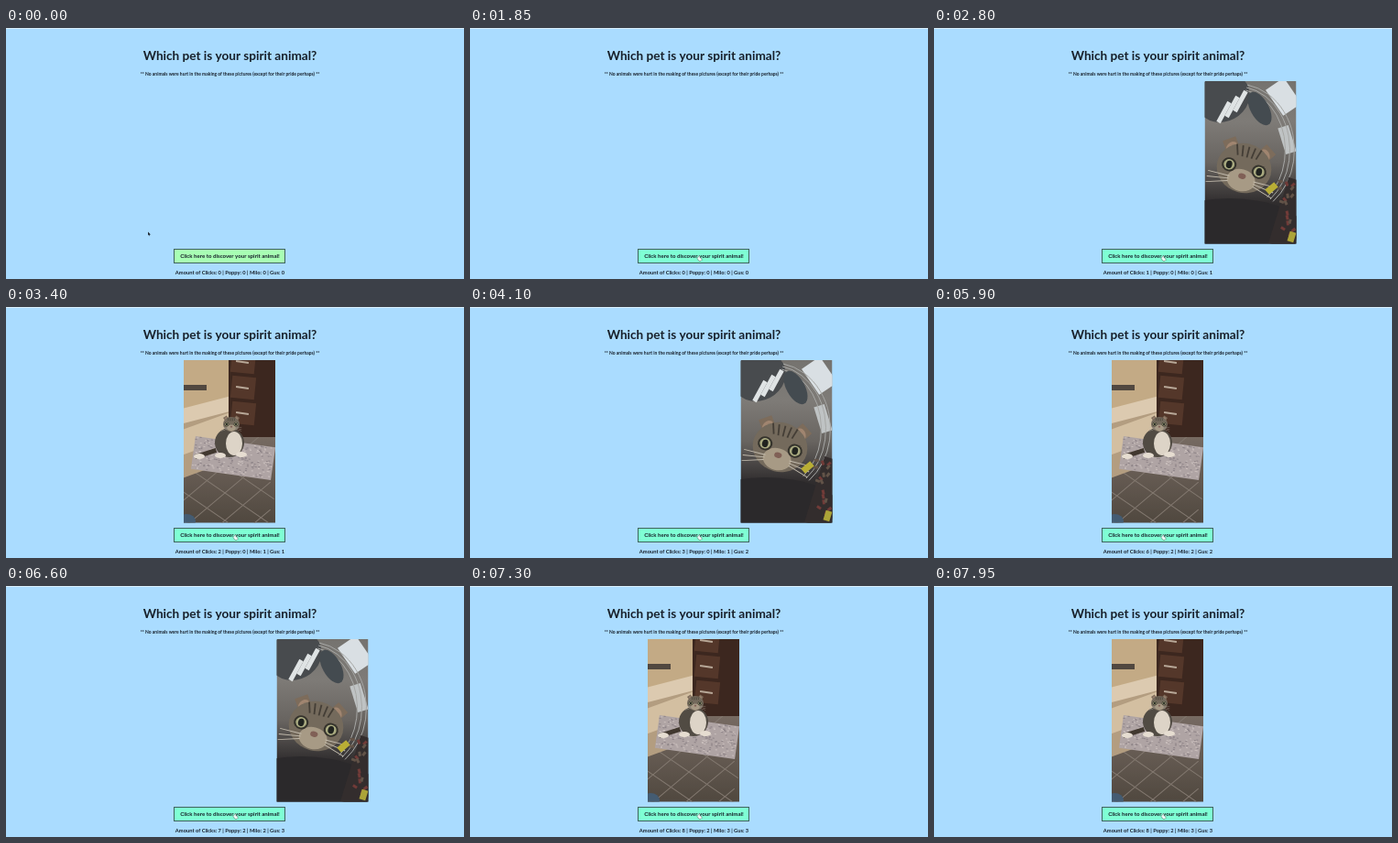
Animation, 500 px wide and 274 px high, one loop 8 s. Source, as an HTML page with a canvas:

```html
<!DOCTYPE html>
<html lang="en">
<head>
<meta charset="utf-8">
<title>Spirit animal</title>
<style>
  html, body { margin: 0; width: 100%; height: 100%; overflow: hidden; background: #aadcff; }
  canvas { display: block; }
</style>
</head>
<body>
<canvas id="stage" width="500" height="274"></canvas>
<script>
const ctx = document.getElementById('stage').getContext('2d');
const LOOP = 8000, CENTER = 244.5, PHOTO_W = 100, PHOTO_H = 177.5;
const FIRST_CLICK = 2150, CLICK_GAP = 700;
const PETS = ['Poppy', 'Milo', 'Gus'];
const PICKS = [2, 1, 2, 0, 0, 1, 2, 1];

function rect(color, x, y, w, h) {
  ctx.fillStyle = color;
  ctx.fillRect(x, y, w, h);
}

function oval(color, x, y, rx, ry, turn = 0) {
  ctx.fillStyle = color;
  ctx.beginPath();
  ctx.ellipse(x, y, rx, ry, turn, 0, Math.PI * 2);
  ctx.fill();
}

function at(x, y, turn, paint) {
  ctx.save();
  ctx.translate(x, y);
  ctx.rotate(turn);
  paint();
  ctx.restore();
}

// Rectangle turned about its middle
function band(color, x, y, w, h, turn) {
  at(x, y, turn, () => rect(color, -w / 2, -h / 2, w, h));
}

function fade(...colors) {
  const g = ctx.createLinearGradient(0, 0, 0, PHOTO_H);
  colors.forEach((c, i) => g.addColorStop(i / (colors.length - 1), c));
  return g;
}

function scatter(count, seed, paint) {
  const random = () => (seed = seed * 16807 % 2147483647) / 2147483647;
  for (let i = 0; i < count; i++) paint(i, random(), random());
}

function text(str, y, size) {
  ctx.font = `700 ${size}px Lato, sans-serif`;
  ctx.textAlign = 'center';
  ctx.fillStyle = '#17202a';
  ctx.fillText(str, CENTER, y);
}

// Head of radius 1, built from mirrored halves
function catFace(x, y, size, turn) {
  at(x, y, turn, () => {
    ctx.scale(size, size);
    for (const side of [-1, 1]) {
      band('#7d6c5b', side * .65, -.7, .5, .5, side * .6);
      oval('#a08570', side * .62, -.62, .18, .24, side * -.5);
    }
    oval('#746a5c', 0, 0, 1, .9);
    for (let i = -2; i <= 2; i++) band('#443e36', i * .2, -.6, .06, .4, i * .15);
    oval('#a79a85', 0, .45, .52, .4);
    for (const side of [-1, 1]) {
      oval('#35332c', side * .56, 0, .27, .25);
      oval('#a9aa80', side * .56, 0, .2, .19);
      oval('#20231f', side * .56, 0, .11, .14);
      for (let i = 0; i < 3; i++) band('#c4bdaf', side * .85, .4 + i * .15, .8, .03, side * i * .15);
    }
    oval('#806056', 0, .3, .14, .1);
  });
}

function dogPhoto() {
  rect(fade('#b0afad', '#bab8b5', '#4a4b50'), 0, 0, 100, 178);
  rect('#88878a', 80, 0, 20, 45);
  oval('#333339', 70, 100, 90, 62);
  oval('#222328', 20, 40, 7, 6);
  oval('#76767c', 26, 59, 11, 14);
  // Dog
  oval('#874a30', 76, 98, 28, 27);
  for (let i = 0; i < 2; i++) band('#945438', 33, 109 + i * 9, 56, 8, -.2);
  oval('#a16140', 82, 65, 17, 13);
  oval('#a16140', 67, 69, 13, 6);
  oval('#743d28', 92, 74, 7, 13);
  oval('#2f2020', 55, 69, 3, 2);
  // Blankets
  oval('#3d89a9', 26, 163, 70, 38);
  oval('#58a2be', 25, 141, 24, 8, -.2);
  oval('#6f8797', 67, 169, 27, 20);
  oval('#ac2033', 103, 142, 23, 50);
}

function tilePhoto() {
  rect(fade('#b9a27e', '#746860', '#50483f'), 0, 0, 100, 178);
  for (let i = -1; i < 3; i++) {
    band('#837970', 45, 145 + i * 30, 130, 1, .6);
    band('#837970', 45, 145 + i * 30, 130, 1, -.7);
  }
  // Tub
  rect('#c3aa85', 0, 0, 50, 62);
  rect('#514840', 0, 27, 25, 6);
  band('#b39d80', 20, 88, 76, 62, -.35);
  band('#dccab0', 22, 55, 72, 16, -.25);
  band('#d3bfa1', 20, 82, 72, 26, -.35);
  // Drawers
  rect('#3c271f', 49, 0, 51, 84);
  for (let i = 0; i < 3; i++) {
    band('#54372a', 65, 2 + i * 28, 26, 24, .1);
    band('#b8a898', 64, 2 + i * 28, 14, 2, .15);
  }
  // Woven mat
  at(54, 107, .14, () => {
    rect('#afa4a4', -44, -18, 88, 36);
    scatter(260, 31, (i, u, v) => rect(i % 2 ? '#cbc0be' : '#8d8387', u * 86 - 44, v * 35 - 18, 2, 1));
  });
  // Cat
  oval('#514b43', 50, 90, 16, 16);
  oval('#ddd4c7', 55, 91, 9, 13);
  band('#41382f', 24, 102, 24, 5, -.3);
  for (let i = 0; i < 3; i++) oval('#e6ddd1', 17 + i * 23, 105 - i, 6, 3);
  catFace(52, 70, 9, 0);
  oval('#445c72', 3, 176, 10, 8);
}

function domePhoto() {
  rect(fade('#75736f', '#7e7b77', '#686460', '#302d2e', '#252326'), 0, 0, 100, 178);
  oval('#484b4e', 20, 18, 30, 26, -.5);
  band('#d9dfe3', 86, 17, 24, 34, -.6);
  band('#bfc3c4', 90, 64, 12, 30, -.3);
  for (let i = 0; i < 3; i++) {
    band('#dfe3e4', 21 + i * 9, 34 - i * 6, 5, 25, .5);
    ctx.strokeStyle = '#a7a8a6';
    ctx.beginPath();
    ctx.ellipse(36, 75, 52 + i * 5, 66 + i * 3, 0, -1.4, .9);
    ctx.stroke();
  }
  oval('#444b50', 60, 30, 10, 20, -.5);
  oval('#2b292b', 27, 163, 82, 35);
  catFace(43, 95, 30, .25);
  // Clutter beside the dome
  band('#332d2d', 94, 145, 28, 75, .3);
  scatter(18, 9, (i, u, v) =>
    band(i % 2 ? '#713b38' : '#625348', 82 + u * 18, 105 + v * 65, 5, 3, u * 3));
  band('#b9ae35', 73, 117, 13, 7, -.7);
  band('#aca438', 95, 170, 7, 11, .3);
}

const PHOTOS = [[93, dogPhoto], [194, tilePhoto], [295.5, domePhoto]];

function photo(index) {
  const [x, paint] = PHOTOS[index];
  at(x, 58, 0, () => {
    ctx.beginPath();
    ctx.rect(0, 0, PHOTO_W, PHOTO_H);
    ctx.clip();
    ctx.filter = 'blur(0.7px)';
    paint();
  });
}

function pointerAt(t) {
  const p = Math.min(1, Math.max(0, (t - 100) / 600));
  const eased = p * p * (3 - 2 * p);
  return [155 + 95 * eased, 222.5 + 26 * eased];
}

function pointer(x, y, hovering) {
  at(x, y, 0, () => {
    const outline = new Path2D(hovering ? 'M0 0h1v2l2 1v2l-1 1h-2l-2-3z' : 'M0 0v4l1-1 1 2v-2h1z');
    ctx.fillStyle = hovering ? '#e9f8f3' : '#202a33';
    ctx.fill(outline);
    ctx.strokeStyle = '#46635d';
    ctx.lineWidth = .5;
    if (hovering) ctx.stroke(outline);
  });
}

function draw(t) {
  rect('#aadcff', 0, 0, 500, 274);
  rect('#d9effc', 0, 0, 500, 1);
  text('Which pet is your spirit animal?', 34.5, 13.6);
  text('** No animals were hurt in the making of these pictures (except for their pride perhaps) **', 52, 4.97);

  const clicks = Math.max(0, Math.floor((t - FIRST_CLICK) / CLICK_GAP) + 1);
  const done = PICKS.slice(0, clicks);
  if (done.length) photo(done[done.length - 1]);

  const [x, y] = pointerAt(t);
  const hovering = x > 183 && y > 241;
  rect(hovering ? '#7fffd4' : '#a8ffb4', 183, 241, 122, 16);
  ctx.strokeStyle = '#3f625c';
  ctx.lineWidth = 1;
  ctx.strokeRect(183.5, 241.5, 121, 15);
  text('Click here to discover your spirit animal!', 251, 6.12);

  const tally = PETS.map((name, i) => `${name}: ${done.filter(pick => pick === i).length}`);
  text([`Amount of Clicks: ${done.length}`, ...tally].join(' | '), 268.5, 5.75);
  pointer(x, y, hovering);
}

function frame(now) {
  draw(now % LOOP);
  requestAnimationFrame(frame);
}
requestAnimationFrame(frame);
</script>
</body>
</html>
```
